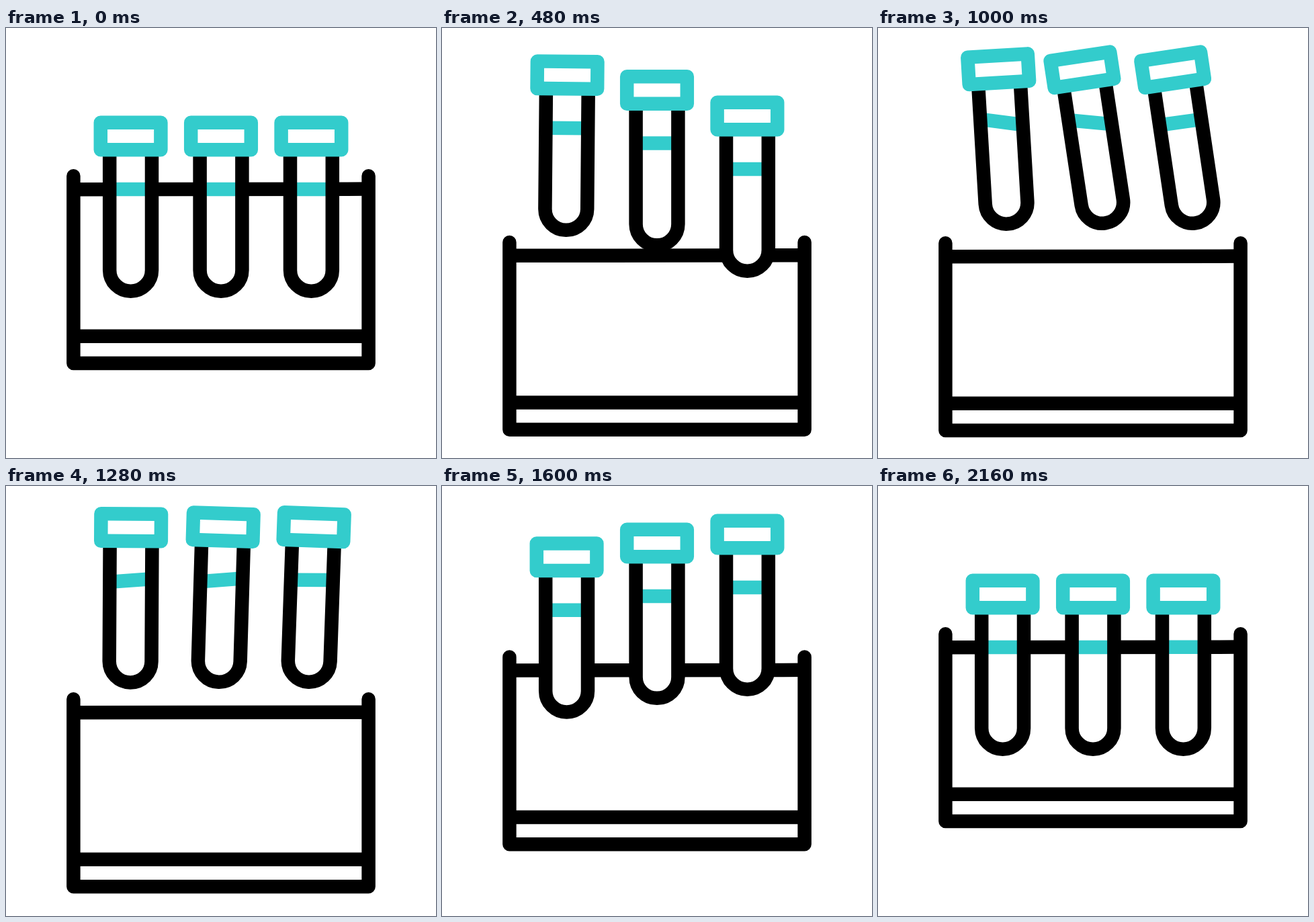
Write an HTML page that moves like this. It is 640 px wide and 640 px high and loops after 2680 ms.

```html
<!DOCTYPE html>
<html lang="en">
<head>
<meta charset="utf-8">
<title>Test tube rack</title>
<style>
html, body { margin: 0; height: 100%; overflow: hidden; background: #fff; }
svg { display: block; width: 100vw; height: 100vh; }
path { stroke: #000; stroke-width: 20.5; stroke-linejoin: round; fill: none; }
.round { stroke-linecap: round; }
.filled { fill: #fff; }
.teal { stroke: #3cc; }
</style>
</head>
<body>
<svg viewBox="0 0 640 640">
  <g id="rack">
    <path d="M100.4 240.2L539.6 239.6"/>
    <path class="round" d="M100.4 458.8H539.6M100.4 220.3V499.1H539.6V220.3"/>
  </g>
  <g id="tubes"></g>
</svg>
<script>
const LOOP = 2680, STEP = 40, LAG = 80, PIVOT = 268.5, LIFT = 100;
const rack = document.getElementById('rack');
const holder = document.getElementById('tubes');

// Horizontal centre, start of the rise and start of the descent
const tubes = [[185.6, 77, 1177], [320, 159, 1256], [454.4, 243, 1335]].map(([x, rise, fall]) => {
  const el = document.createElementNS('http://www.w3.org/2000/svg', 'g');
  el.innerHTML = `
    <path class="filled" stroke="none" style="stroke:none" d="M-31.4 181V360.4a31.4 31.4 0 0 0 62.8 0V181z"/>
    <path class="teal band" d="M-31.4 239.9H31.4"/>
    <path d="M-31.4 181V360.4a31.4 31.4 0 0 0 62.8 0V181"/>
    <path class="teal filled" d="M-44.8 140.8h89.6v40.5h-89.6z"/>`;
  holder.append(el);
  return { x, rise, fall, el, band: el.querySelector('.band') };
});

// [time, degrees] in the time of the first tube
const swing = [[432, 0], [640, 10], [880, -8.8], [1120, 2], [1360, 0]];
const slosh = [[525, 0], [750, -13], [930, 14.2], [1200, -6], [1440, 0]];

const clamp = u => Math.min(1, Math.max(0, u));
const cubic = u => u < 0.5 ? 4 * u ** 3 : 1 - 4 * (1 - u) ** 3;
const smooth = u => u * u * (3 - 2 * u);
const ramp = (t, start, length) => cubic(clamp((t - start) / length));
const travel = (t, out, back) => LIFT * (ramp(t, out, 562) - ramp(t, back, 878));

function follow(keys, t, ease) {
  let value = keys[0][1];
  for (let i = 1; i < keys.length; i++) {
    const [t0, a] = keys[i - 1], [t1, b] = keys[i];
    value += (b - a) * ease(clamp((t - t0) / (t1 - t0)));
  }
  return value;
}

function draw() {
  const t = Math.floor(performance.now() % LOOP / STEP) * STEP;
  rack.setAttribute('transform', `translate(0 ${travel(t, 2, 1109)})`);
  tubes.forEach(({ x, rise, fall, el, band }, i) => {
    const own = t - i * LAG;
    const y = -travel(t, rise, fall);
    el.setAttribute('transform', `translate(${x} ${y}) rotate(${follow(swing, own, cubic)} 0 ${PIVOT})`);
    band.setAttribute('transform', `rotate(${follow(slosh, own, smooth)} 0 239.9)`);
  });
  requestAnimationFrame(draw);
}
draw();
</script>
</body>
</html>
```
